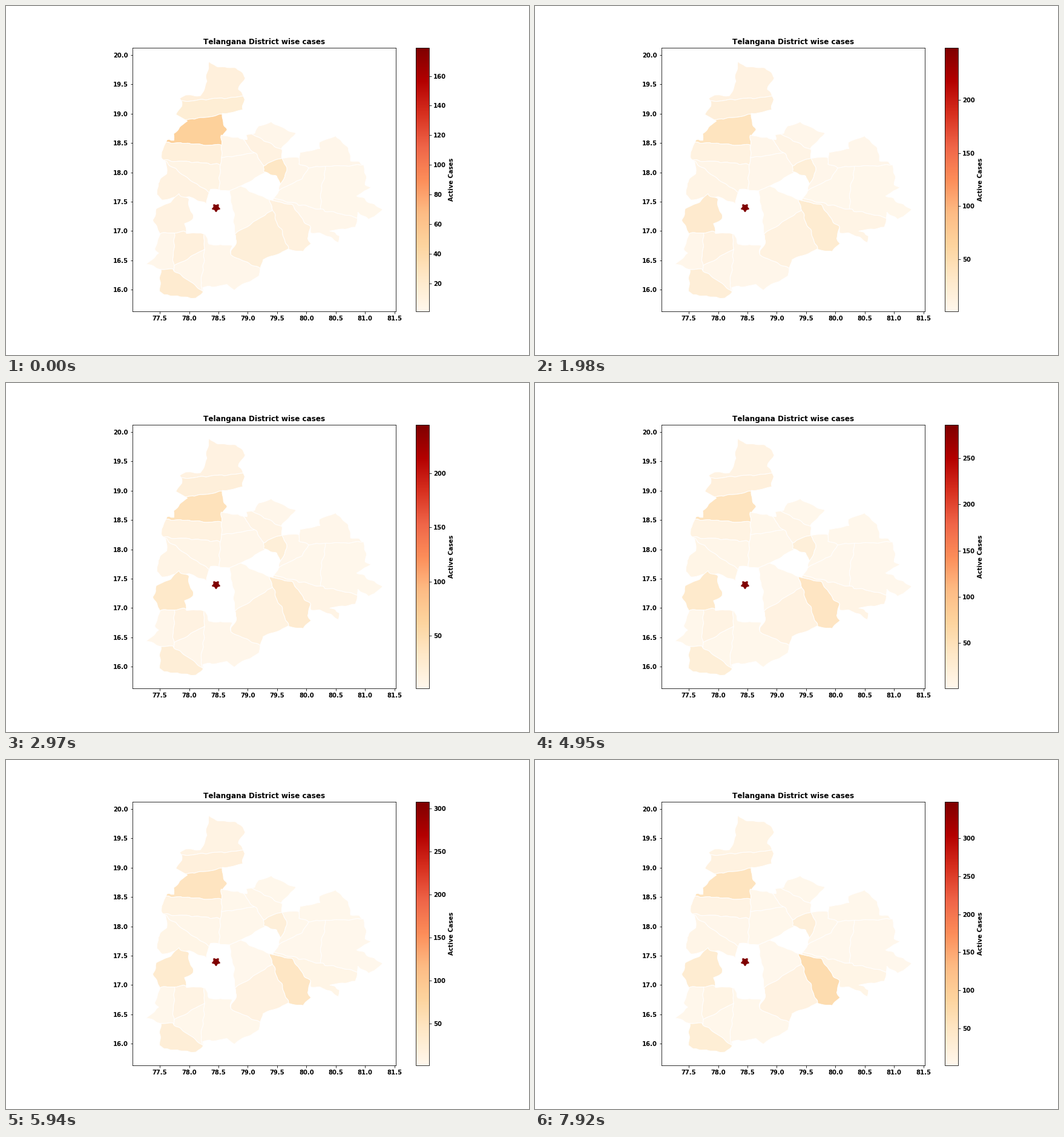
These frames come from a looping animation (864 by 576 pixels, 8000 ms). A matplotlib script:

```python
import matplotlib.pyplot as plt
import numpy as np
from matplotlib.animation import FuncAnimation
from matplotlib.collections import PolyCollection

W, H, DPI = 864, 576, 72
LOOP, STEP, HOLD, DAYS = 8000, 40, 990, 9      # times in ms
LEFT, TOP, SIDE = 208.8, 69.12, 434.88         # map frame in pixels
WEST, NORTH, SPAN = 77.0321, 20.1211, 4.4898   # map frame in degrees

plt.rcParams.update({
    "font.family": "DejaVu Sans", "font.size": 10, "font.weight": "bold",
    "axes.labelweight": "bold", "axes.titleweight": "bold",
    "text.kerning_factor": 6,
})

# Short random waves that make straight borders look surveyed.
rng = np.random.default_rng(4)
turn, heading, phase = rng.uniform(0, 2 * np.pi, (3, 9))
pitch = 2 * np.pi / rng.uniform(9, 30, 9)


def wobble(xy):
    along = xy[:, :1] * np.cos(turn) + xy[:, 1:] * np.sin(turn)
    push = 0.65 * np.sin(along * pitch + phase)
    return xy + np.column_stack([push @ np.cos(heading), push @ np.sin(heading)])


def densify(points, gap=2.5):
    points = np.array(points, float)
    runs = []
    for p, q in zip(points, np.roll(points, -1, axis=0)):
        n = max(1, int(np.hypot(*(q - p)) / gap))
        runs.append(p + (q - p) * np.arange(n)[:, None] / n)
    return np.vstack(runs)


def to_degrees(xy):
    scale = SPAN / SIDE
    return np.column_stack([WEST + (xy[:, 0] - LEFT) * scale,
                            NORTH - (xy[:, 1] - TOP) * scale])


def left_of(region, p, q):
    """Part of a region on the left hand when walking from p to q."""
    def offset(r):
        return (q[0] - p[0]) * (r[1] - p[1]) - (q[1] - p[1]) * (r[0] - p[0])

    kept = []
    for a, b in zip(region, region[1:] + region[:1]):
        da, db = offset(a), offset(b)
        if da <= 0:
            kept.append(a)
        if da * db < 0:
            t = da / (da - db)
            kept.append((a[0] + t * (b[0] - a[0]), a[1] + t * (b[1] - a[1])))
    return kept


def cut(region, p, q):
    return left_of(region, p, q), left_of(region, q, p)


shapes, counts = [], []


def district(xy, *cases):
    """Cases are spread evenly over the days."""
    shapes.append(to_degrees(xy))
    counts.append(np.interp(np.linspace(0, 1, DAYS), np.linspace(0, 1, len(cases)), cases))


def land(region, *cases):
    district(wobble(densify(region)), *cases)


# North-west, from top to bottom
block = [(333, 91), (347, 99), (382, 103), (395, 118), (385, 137), (393, 154), (391, 172),
         (357, 178), (363, 206), (356, 222), (355, 280), (352, 303), (338, 302),
         (332, 328), (303, 315), (258, 319), (250, 311), (250, 292), (266, 276),
         (257, 241), (265, 222), (279, 221), (278, 210), (299, 190), (281, 179),
         (289, 166), (288, 152), (297, 147), (321, 149), (333, 124)]
top, block = cut(block, (299, 188), (353, 180))
crown, belt = cut(top, (321, 155), (384, 150))
land(crown, 11)
land(belt, 15, 17, 17, 18, 16)
orange, block = cut(block, (279, 226), (355, 230))
land(orange, 48, 39, 44, 47, 54)
strip, block = cut(block, (262, 254), (355, 262))
land(strip, 12)
lower, upper = cut(block, (340, 310), (284, 272))
land(lower, 8, 7)
land(upper, 6, 5)

# South-west
block = [(285, 310), (303, 320), (308, 352), (296, 360), (301, 374), (330, 376), (336, 393),
         (374, 395), (371, 412), (420, 433), (420, 445), (377, 468), (366, 460), (326, 465),
         (326, 472), (275, 434), (256, 435), (232, 425), (252, 408), (248, 400), (253, 377),
         (243, 353), (249, 334), (272, 324)]
top, block = cut(block, (253, 376), (301, 372))
land(top, 8, 28, 33, 33, 34)
strip, block = cut(block, (278, 434), (278, 366))
land(strip, 3)
block, tail = cut(block, (324, 466), (328, 386))
land(tail, 3)
upper, lower = cut(block, (279, 428), (312, 410))
land(upper, 11)
land(lower, 3)
land([(256, 435), (275, 434), (326, 472), (314, 483), (262, 476), (253, 470)],
     19, 20, 20, 24, 29)

# Centre
block = [(357, 213), (398, 221), (398, 212), (411, 209), (418, 198), (438, 192), (479, 210),
         (455, 236), (456, 250), (425, 264), (427, 276), (390, 296), (371, 305),
         (352, 303), (355, 280), (356, 222)]
near, far = cut(block, (425, 262), (394, 222))
upper, lower = cut(near, (355, 251), (400, 244))
land(upper, 3)
land(lower, 3)
upper, lower = cut(far, (411, 214), (455, 238))
land(upper, 3)
land(lower, 8, 5)
land([(425, 264), (456, 250), (463, 272), (455, 293), (447, 282), (425, 274)],
     25, 19, 19, 22, 25)

# South
block = [(371, 305), (390, 296), (403, 306), (440, 322), (472, 328), (501, 366), (498, 383),
         (502, 393), (491, 406), (466, 402), (423, 419), (420, 433), (371, 412),
         (381, 386), (376, 376), (378, 362), (374, 330)]
block, slope = cut(block, (468, 404), (436, 324))
land(slope, 10, 18, 25, 25, 25, 42, 43, 44, 71)
upper, lower = cut(block, (384, 372), (440, 338))
land(upper, 2)
land(lower, 13, 12, 12, 13, 15)

# East
land([(456, 250), (484, 250), (484, 260), (500, 266), (490, 284), (450, 305),
      (455, 293), (463, 272)], 3)
block = [(484, 250), (486, 241), (518, 236), (518, 225), (545, 214), (565, 235), (571, 255),
         (591, 262), (594, 294), (603, 299), (582, 312), (622, 336), (600, 353), (580, 340),
         (579, 365), (536, 371), (552, 380), (550, 390), (526, 377), (503, 374),
         (501, 366), (472, 328), (440, 322), (450, 305), (490, 284), (500, 266), (484, 260)]
top, block = cut(block, (500, 266), (571, 263))
land(top, 3)
block, bottom = cut(block, (480, 326), (590, 352))
land(bottom, 3, 7, 8, 8, 8)
near, far = cut(block, (518, 338), (526, 268))
land(near, 2)
land(far, 2)

# The small dark capital sets the top of the scale.
angle = np.linspace(0, 2 * np.pi, 40, endpoint=False)
radius = 6.4 + 1.2 * np.sin(5 * angle)
district(np.column_stack([347 + radius * np.cos(angle), 333 + radius * np.sin(angle)]),
         179, 214, 249, 245, 240, 286, 308, 329, 348)
counts = np.array(counts).T

fig = plt.figure(figsize=(W / DPI, H / DPI), dpi=DPI)


def panel(x, width):
    return fig.add_axes([x / W, 1 - (TOP + SIDE) / H, width / W, SIDE / H])


ax = panel(LEFT, SIDE)
ax.set_xlim(WEST, WEST + SPAN)
ax.set_ylim(NORTH - SPAN, NORTH)
ax.set_title("Telangana District wise cases", fontsize=12)

regions = PolyCollection(shapes, cmap="OrRd", edgecolors="white", linewidths=1)
regions.set_array(counts[0])
regions.set_clim(1, counts[0].max())
ax.add_collection(regions, autolim=False)

bar = fig.colorbar(regions, cax=panel(677.16, SIDE / 20))
bar.set_label("Active Cases")


def update(i):
    # A frame that straddles a change already shows the new day.
    day = ((i + 1) * STEP - 1) // HOLD
    regions.set_array(counts[day])
    regions.set_clim(1, counts[day].max())
    return [regions]


anim = FuncAnimation(fig, update, frames=LOOP // STEP, interval=STEP,
                     repeat=True, repeat_delay=0, blit=False)
plt.show()
```
